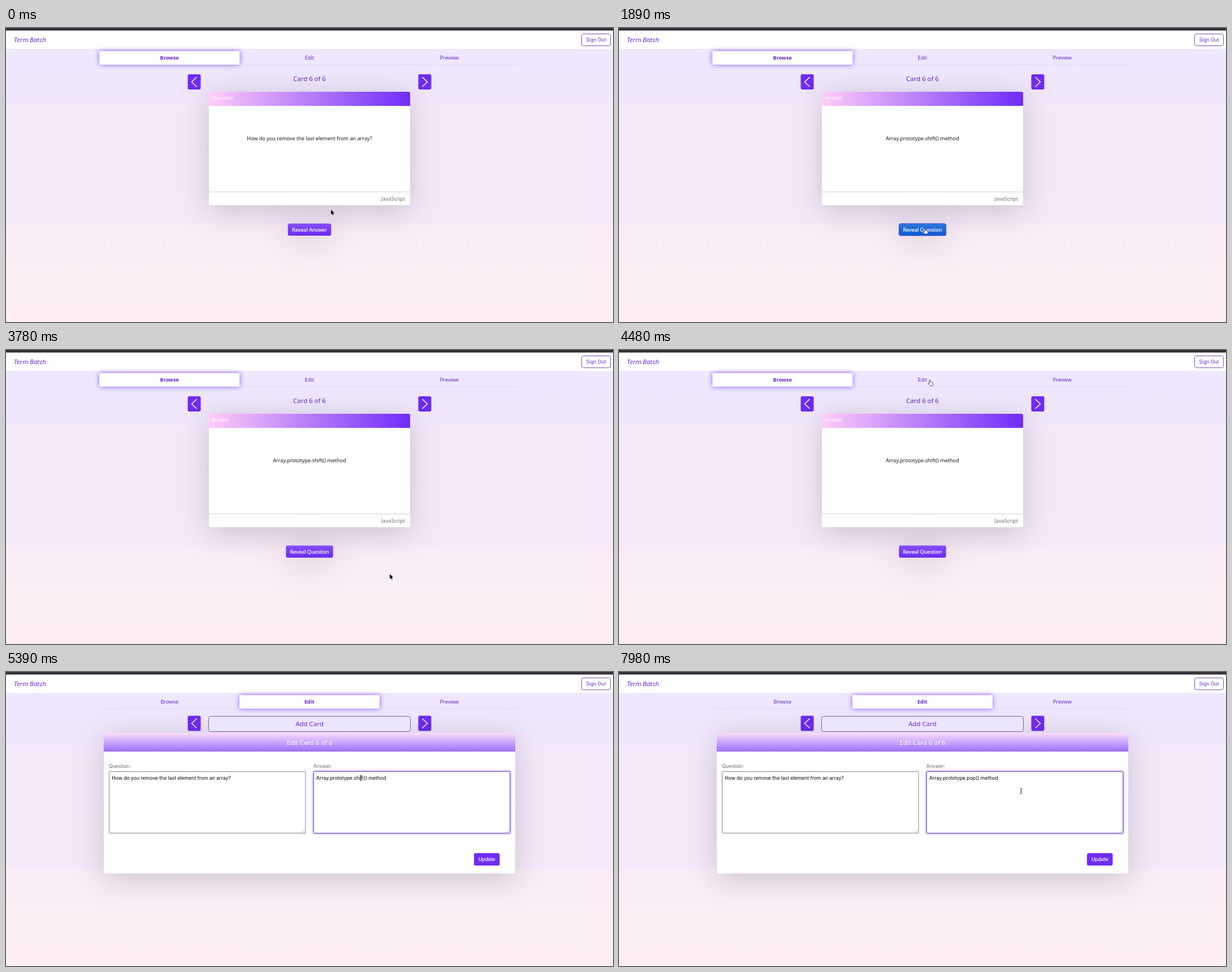
These frames come from a looping animation (1074x521 px, 8 s). An HTML page:

```html
<!DOCTYPE html>
<html lang="en">
<head>
<meta charset="utf-8">
<title>Flash cards</title>
<style>
  html, body { margin: 0; width: 100%; height: 100%; overflow: hidden; background: #fdeef2; }
  svg { display: block; width: 100vw; height: 100vh; }
  text { font-family: "Noto Sans", "Open Sans", sans-serif; font-size: 9.1px; white-space: pre; }
  .big { font-size: 11.4px; }
  .ui { font-family: Inter, Roboto, sans-serif; font-size: 8.65px; }
  .mid { text-anchor: middle; }
  .end { text-anchor: end; }
  .strong { stroke: #fff; stroke-width: .2px; }
  .lift { filter: drop-shadow(0 9px 27px rgba(0, 0, 0, .175)); }
  .glow { filter: drop-shadow(0 0 5px rgba(111, 44, 245, .75)); }
  .focus { filter: drop-shadow(0 0 2px rgba(111, 44, 245, .8)); }
</style>
</head>
<body>
<svg id="stage" viewBox="0 0 1074 521" xmlns="http://www.w3.org/2000/svg">
  <defs>
    <linearGradient id="sky" x2="0" y2="1">
      <stop offset="0" stop-color="#eee7fd"/>
      <stop offset=".17" stop-color="#f0e7fc"/>
      <stop offset=".2" stop-color="#f4e8fb"/>
      <stop offset=".64" stop-color="#f5e8fa"/>
      <stop offset=".64" stop-color="#f9ecf6"/>
      <stop offset=".85" stop-color="#fceef4"/>
      <stop offset="1" stop-color="#feeef1"/>
    </linearGradient>
    <linearGradient id="side">
      <stop offset="0" stop-color="#ffccf8"/>
      <stop offset="1" stop-color="#6f2cfa"/>
    </linearGradient>
    <linearGradient id="down" x2="0" y2="1">
      <stop offset="0" stop-color="#f9dcfc"/>
      <stop offset="1" stop-color="#9c6ffd"/>
    </linearGradient>
    <linearGradient id="violet" x2="0" y2="1">
      <stop offset="0" stop-color="#854df8"/>
      <stop offset="1" stop-color="#6c2af5"/>
    </linearGradient>
    <linearGradient id="blue" x2="0" y2="1">
      <stop offset="0" stop-color="#2f77de"/>
      <stop offset="1" stop-color="#0b5ad3"/>
    </linearGradient>
  </defs>
</svg>
<script>
const LOOP = 8000, TICK = 70;
const PURPLE = '#6f2cf5', INK = '#6424c4';
const stage = document.getElementById('stage');

function add(parent, tag, attrs = {}, content = '') {
  const el = document.createElementNS('http://www.w3.org/2000/svg', tag);
  set(el, attrs);
  el.textContent = content;
  return parent.appendChild(el);
}
function set(el, attrs) {
  for (const key in attrs) el.setAttribute(key, attrs[key]);
}
const group = parent => add(parent, 'g');
const rect = (parent, x, y, width, height, attrs) =>
  add(parent, 'rect', { x, y, width, height, ...attrs });
const label = (parent, x, y, content, fill, cls = '') =>
  add(parent, 'text', { x, y, fill, class: cls }, content);
const show = (el, on) => el.setAttribute('visibility', on ? 'visible' : 'hidden');

function arrows(parent, y) {
  for (const [x, dir] of [[321.5, -1], [729.5, 1]]) {
    rect(parent, x, y, 23, 27, { rx: 3, fill: PURPLE });
    add(parent, 'path', {
      d: `M${x + 11.5 - dir * 4.5} ${y + 5}l${dir * 9} 8.5l${-dir * 9} 8.5`,
      fill: 'none', stroke: '#fff', 'stroke-width': 1.5
    });
  }
}

// Page frame
rect(stage, 0, 37, 1074, 484, { fill: 'url(#sky)' });
rect(stage, 0, 0, 1074, 37, { fill: '#fff' });
rect(stage, 0, 0, 1074, 4.5, { fill: '#352f38' });
label(stage, 14, 25, 'Term Batch', '#6a22dc', 'big').setAttribute('font-style', 'italic');
rect(stage, 1018.5, 10.5, 51, 21, { rx: 3, fill: '#fff', stroke: '#7650b4' });
label(stage, 1044, 24, 'Sign Out', '#6a28cc', 'ui mid');

// Tabs
rect(stage, 165, 64.5, 743, 1, { fill: '#e0daf2' });
const tabBack = rect(stage, 165, 41, 248, 24, { rx: 2, fill: '#fff', class: 'glow' });
const tabs = ['Browse', 'Edit', 'Preview'].map((name, i) =>
  label(stage, 289.2 + i * 247.6, 56, name, INK, 'mid'));

// Browse pane
const browse = group(stage);
arrows(browse, 82);
label(browse, 537, 94, 'Card 6 of 6', INK, 'big mid');
rect(browse, 359, 113, 356, 201, { rx: 3, fill: '#fff', class: 'lift' });
add(browse, 'path', { d: 'M359 138V116q0-3 3-3h350q3 0 3 3v22z', fill: 'url(#side)' });
rect(browse, 359, 290, 356, 1, { fill: '#d3d0d5' });
label(browse, 706, 305.7, 'JavaScript', '#6c6870', 'end');
const side = label(browse, 363.5, 126.6, '', '#fff');
const cardText = label(browse, 537, 198.6, '', '#18161a', 'mid');
const reveal = rect(browse, 499, 346.5, 76, 21.5, { rx: 3, class: 'lift' });
const revealText = label(browse, 537, 360.6, '', '#fff', 'mid strong');

// Edit pane
const edit = group(stage);
const QUESTION = 'How do you remove the last element from an array?';
const STEM = 'Array.prototype.';
arrows(edit, 77.5);
rect(edit, 173, 108, 728, 249, { rx: 3, fill: '#fff', class: 'lift' });
rect(edit, 173, 108, 728, 33, { fill: 'url(#down)' });
rect(edit, 358.5, 78.5, 357, 27, { rx: 4, fill: '#ece6fc', stroke: '#73609c' });
label(edit, 537, 96, 'Add Card', '#6a28cc', 'big mid');
label(edit, 537, 129, 'Edit Card 6 of 6', '#fff', 'big mid');

function field(x, name) {
  label(edit, x - .5, 170, name, '#6b676f', 'ui');
  const box = rect(edit, x, 176.5, 347.5, 109, { rx: 1, fill: '#fff' });
  add(edit, 'path', { d: `M${x + 341} 284.5l5-5m-2 5l2-2`, stroke: '#777', 'stroke-width': .6 });
  return box;
}
set(field(182.5, 'Question:'), { stroke: '#858187' });
label(edit, 187.3, 191, QUESTION, '#050505', 'ui');
const answerBox = field(544.3, 'Answer:');
const mark = rect(edit, 0, 181, 0, 13, { fill: '#b0d5fd' });
const answer = label(edit, 549, 191, '', '#050505', 'ui');
const caret = rect(edit, 0, 182, .9, 11, { fill: '#111' });
rect(edit, 828, 321, 45.5, 22, { rx: 3, fill: PURPLE });
label(edit, 850.7, 335.2, 'Update', '#fff', 'ui mid strong');

// Pointers, each drawn around its hot spot
const pointers = {
  arrow: add(stage, 'path', {
    d: 'M0 0V8.6L2 6.8 3.2 9.8 4.7 9.2 3.5 6.3H6.2Z',
    fill: '#000', stroke: '#fff', 'stroke-width': .7, 'paint-order': 'stroke'
  }),
  hand: add(stage, 'path', {
    d: 'M-1 .8Q0-.6 1 .8V4Q2.3 3.2 2.7 4.4Q4 3.8 4.3 5Q5.6 4.7 5.6 6V7.5Q5.6 10.3 3 10.3H1.5'
      + 'Q-.3 10.2-2.5 7.3Q-3.4 6-2.4 5.7Q-1.6 5.6-1 6.6Z',
    fill: '#fff', stroke: '#222', 'stroke-width': .8
  }),
  beam: add(stage, 'path', {
    d: 'M-2-4.6Q0-4.6 0-3.6Q0-4.6 2-4.6M0-3.6V3.6M-2 4.6Q0 4.6 0 3.6Q0 4.6 2 4.6M-1 1.2H1',
    fill: 'none', stroke: '#222', 'stroke-width': .9
  })
};

// time, x, y of the hot spot
const path = [
  [0, 575, 322], [840, 550, 370], [980, 532, 392], [1050, 532, 392],
  [1610, 541, 355], [1890, 541, 355], [2380, 569, 395], [2520, 569, 395],
  [2590, 569, 396], [2940, 569, 396], [3010, 569, 393], [3220, 562, 391],
  [3780, 679, 397], [4410, 550, 53], [4480, 550, 53], [4620, 583, 67],
  [5180, 628, 188], [5530, 628, 188], [6090, 712, 211], [6860, 712, 211],
  [6930, 711.5, 211], [LOOP, 711.5, 211]
];
function pointerAt(t) {
  const i = path.findIndex(p => p[0] > t);
  const [t0, x0, y0] = path[i - 1], [t1, x1, y1] = path[i];
  const u = (t - t0) / (t1 - t0), k = u * u * (3 - 2 * u);
  return [x0 + (x1 - x0) * k, y0 + (y1 - y0) * k];
}
const within = ([x, y], l, t, r, b) => x >= l && x <= r && y >= t && y <= b;

function drawBrowse(t, hover) {
  const flipped = t >= 1750;
  side.textContent = flipped ? 'Answer' : 'Question';
  cardText.textContent = flipped ? STEM + 'shift() method' : QUESTION;
  revealText.textContent = flipped ? 'Reveal Question' : 'Reveal Answer';
  const width = flipped ? 83.5 : 76.5;
  set(reveal, {
    x: 537 - width / 2, width,
    fill: hover ? 'url(#blue)' : 'url(#violet)',
    stroke: hover ? '#5a35d8' : 'none', 'stroke-width': .7
  });
}

function drawEdit(t) {
  edit.setAttribute('opacity', t < 4620 ? .35 : t < 4690 ? .87 : 1);
  const focused = t >= 5390;
  set(answerBox, { stroke: focused ? '#6a4bb5' : '#858187', class: focused ? 'focus' : '' });
  const word = t < 6930 ? 'shift' : 'pop'.slice(0, t < 7070 ? 1 : t < 7140 ? 2 : 3);
  answer.textContent = STEM + word + '() method';
  const start = 549 + answer.getSubStringLength(0, STEM.length);
  const size = answer.getSubStringLength(STEM.length, word.length);
  set(mark, { x: start, width: size });
  set(caret, { x: start + size });
  mark.setAttribute('opacity', t >= 5530 && t < 6930 ? 1 : 0);
  caret.setAttribute('opacity', t >= 6930 && t < 7700 ? 1 : 0);
}

function draw(time) {
  const t = Math.floor(time / TICK) * TICK;
  const editing = t >= 4550;
  const at = pointerAt(t);
  const half = t < 1750 ? 38 : 42;
  const hover = !editing && within(at, 537 - half, 346, 537 + half, 368);
  const clickable = hover || within(at, 413, 41, 661, 65)
    || editing && within(at, 358, 78, 716, 106);
  const typing = editing && within(at, 544, 176, 892, 286);
  const kind = clickable ? 'hand' : typing ? 'beam' : 'arrow';

  tabs.forEach((tab, i) => {
    const active = i === (editing ? 1 : 0);
    set(tab, { 'font-weight': active ? 700 : 400, fill: active ? '#6a1fdc' : INK });
  });
  tabBack.setAttribute('x', editing ? 413 : 165.3);
  browse.style.display = editing ? 'none' : '';
  edit.style.display = editing ? '' : 'none';
  if (editing) drawEdit(t); else drawBrowse(t, hover);

  const hidden = t >= 6930 && t < 7980;
  for (const name in pointers) {
    show(pointers[name], name === kind && !hidden);
    pointers[name].setAttribute('transform', `translate(${at[0]} ${at[1]})`);
  }
}

const begin = performance.now();
function loop() {
  draw((performance.now() - begin) % LOOP);
  requestAnimationFrame(loop);
}
loop();
</script>
</body>
</html>
```
